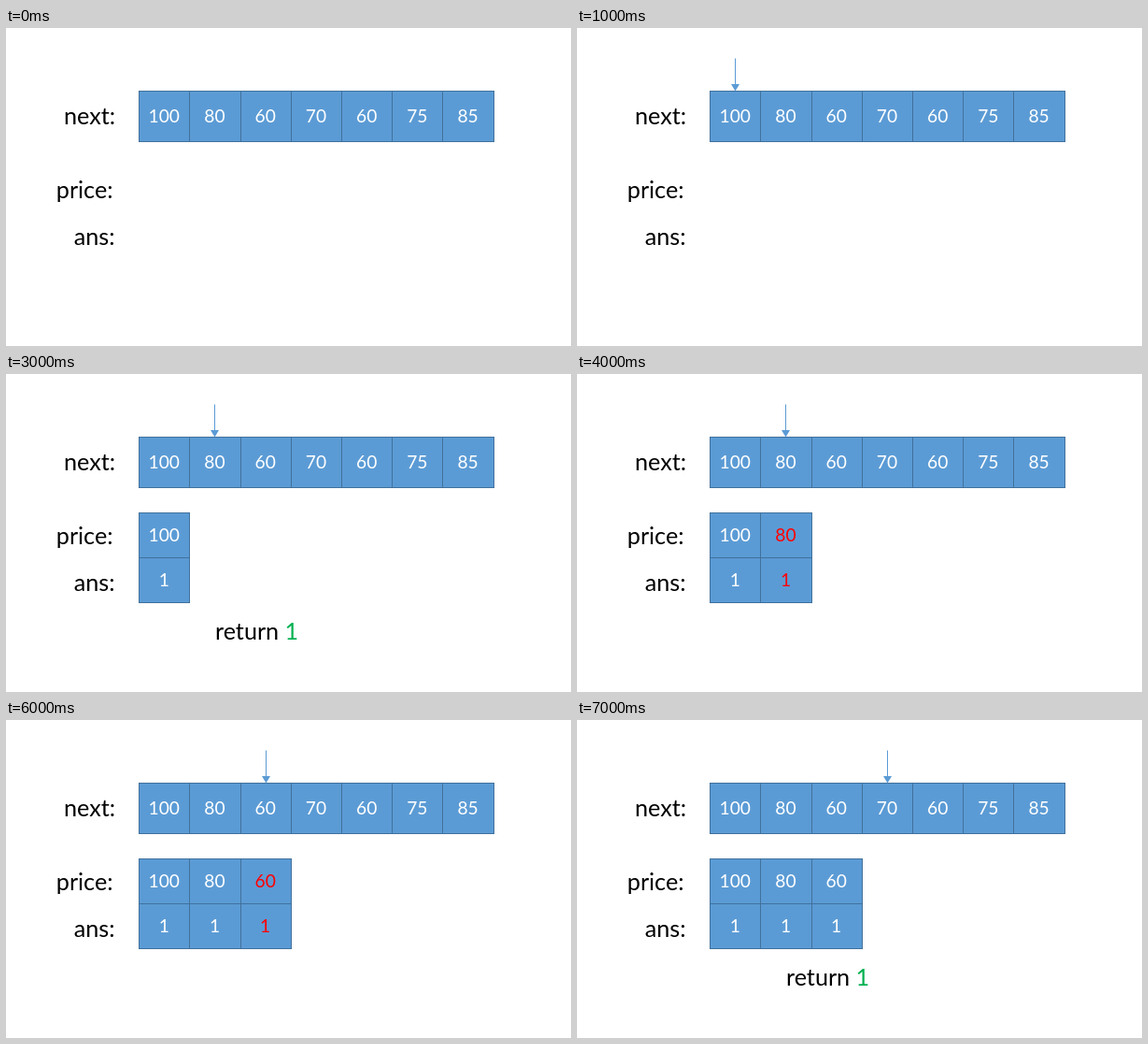
Animation of 605 by 340 pixels, one loop 8000 ms. Source, as an HTML page with a canvas:

```html
<!DOCTYPE html>
<html lang="en">
<head>
<meta charset="utf-8">
<style>
  html, body { margin: 0; width: 100%; height: 100%; overflow: hidden; background: #fff; }
  canvas { display: block; }
</style>
</head>
<body>
<canvas id="stage" width="605" height="340"></canvas>
<script>
const ctx = document.getElementById('stage').getContext('2d');
const BLUE = '#5b9bd5', EDGE = '#41719c', RED = '#ff0000', GREEN = '#00b050';
const STEP_MS = 1000, STEPS = 8, LABEL_SIZE = 25.2, CELL_SIZE = 19.2;
const prices = [100, 80, 60, 70, 60, 75, 85];
const columnX = i => 142.1 + i * 54.23;
const edge = i => Math.round(columnX(i)) + 0.5;
const center = i => columnX(i + 0.5);

function text(value, x, y, size, color = '#000', align = 'left') {
  ctx.font = `${size}px Lato, Carlito, sans-serif`;
  ctx.textAlign = align;
  ctx.fillStyle = color;
  ctx.fillText(value, x, y);
}

function cell(column, top, height, value, baseline, color = '#fff') {
  const x = edge(column), width = edge(column + 1) - x;
  ctx.fillStyle = BLUE;
  ctx.fillRect(x, top, width, height);
  ctx.strokeStyle = EDGE;
  ctx.strokeRect(x, top, width, height);
  text(value, center(column), baseline, CELL_SIZE, color, 'center');
}

function arrow(column) {
  const x = Math.round(center(column)) + 0.5;
  ctx.fillStyle = BLUE;
  ctx.fillRect(x - 0.5, 32.5, 1, 28.5);
  ctx.beginPath();
  ctx.moveTo(x - 4.5, 60);
  ctx.lineTo(x + 4.5, 60);
  ctx.lineTo(x, 67.5);
  ctx.fill();
}

function draw(step) {
  ctx.fillStyle = '#fff';
  ctx.fillRect(0, 0, 605, 340);
  text('next:', 117, 103, LABEL_SIZE, '#000', 'right');
  text('price:', 114.5, 182, LABEL_SIZE, '#000', 'right');
  text('ans:', 116.5, 232, LABEL_SIZE, '#000', 'right');
  prices.forEach((price, i) => cell(i, 67.5, 54, price, 101));

  // Each price is pushed on an even step, then returned on the next odd one.
  const pushed = Math.floor(step / 2), pushing = step % 2 === 0;
  for (let i = 0; i < pushed; i++) {
    const color = pushing && i === pushed - 1 ? RED : '#fff';
    cell(i, 148.5, 48, prices[i], 179, color);
    cell(i, 196.5, 48, 1, 227, color);
  }
  if (step > 0) arrow(pushing ? pushed - 1 : pushed);
  if (pushed > 0 && !pushing) {
    text('return', 224, 284, LABEL_SIZE);
    text('1', 298.5, 284, LABEL_SIZE, GREEN);
  }
}

function frame() {
  draw(Math.floor(performance.now() / STEP_MS) % STEPS);
  requestAnimationFrame(frame);
}
frame();
</script>
</body>
</html>
```
